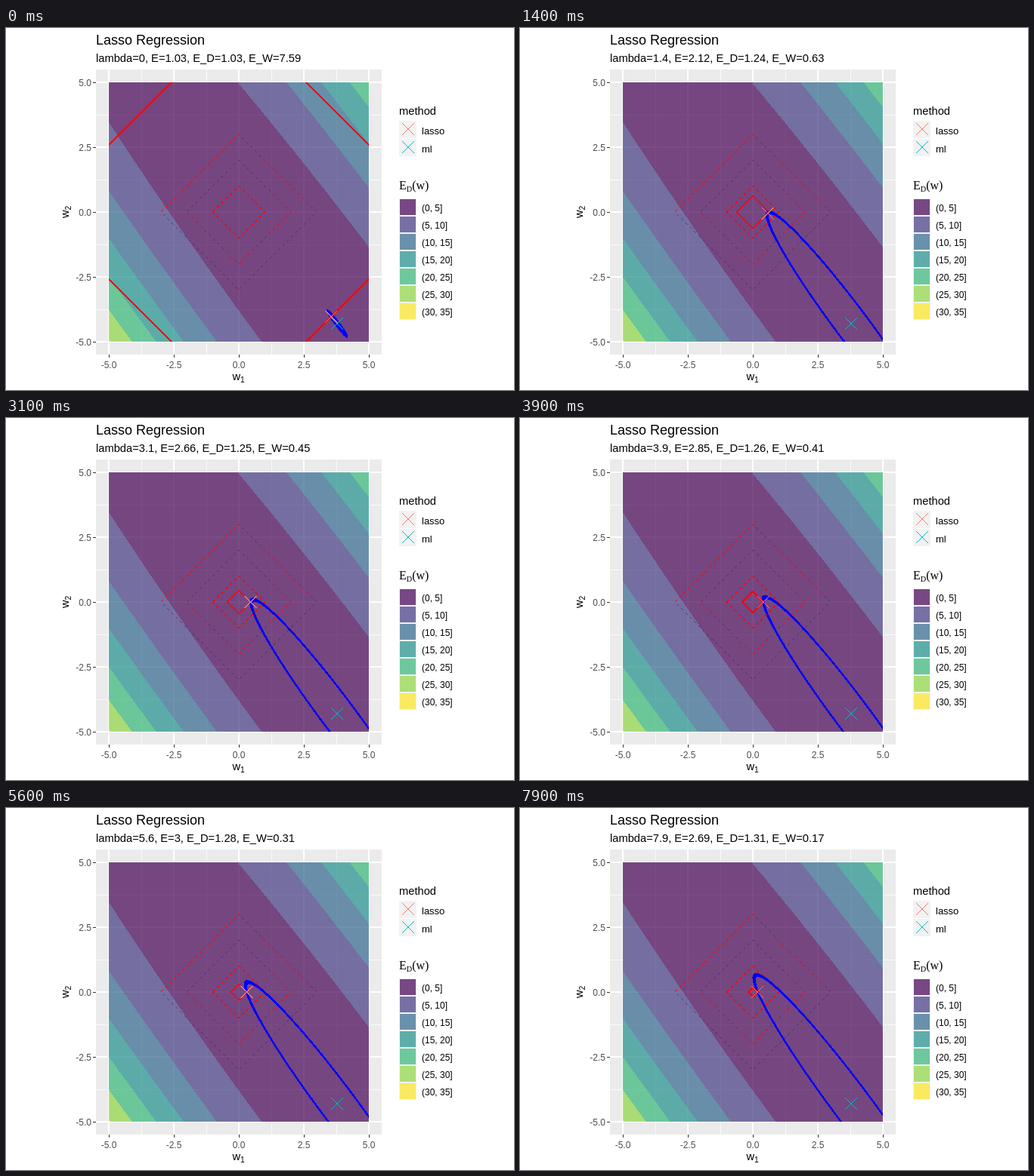
Animation, 672 px wide and 480 px high, one loop 8 s. Source, as an HTML page:

```html
<!DOCTYPE html>
<html lang="en">
<head>
<meta charset="utf-8">
<title>Lasso Regression</title>
<style>
  html, body { margin: 0; width: 100%; height: 100%; overflow: hidden; background: #fff; }
  svg { display: block; width: 672px; height: 480px; }
  text { font-family: "Liberation Sans", Arial, sans-serif; white-space: pre; }
  .tick { font-size: 12px; fill: #4d4d4d; }
  .key { font-size: 12px; }
  .method { font-size: 13px; }
  .head { font-size: 14.7px; }
  .math { font-family: "Liberation Serif", "Times New Roman", serif; font-size: 16px; }
  .sub { font-size: 10.3px; }
  path, line, rect { shape-rendering: crispEdges; }
</style>
</head>
<body>
<svg id="stage" viewBox="0 0 672 480">
  <defs><clipPath id="area"><rect x="136" y="72" width="344" height="344"/></clipPath></defs>
  <rect x="119" y="55" width="378" height="378" fill="#ebebeb"/>
  <g id="grid"></g>
  <g id="bands" clip-path="url(#area)" opacity=".7"></g>
  <g id="dashes" fill="none"></g>
  <g clip-path="url(#area)">
    <path id="ring" fill="#00f" fill-rule="evenodd" stroke="#00f" stroke-width="2"/>
    <path id="diamond" fill="none" stroke="#f00" stroke-width="1.6"/>
  </g>
  <g id="marks"></g>
  <g id="labels"></g>
  <g id="legend"></g>
</svg>
<script>
const byId = id => document.getElementById(id);
const SCALE = 34.4;
const px = x => 308 + SCALE * x;
const py = y => 244 - SCALE * y;

function add(parent, tag, attrs, text) {
  const node = document.createElementNS("http://www.w3.org/2000/svg", tag);
  for (const name in attrs) node.setAttribute(name, attrs[name]);
  if (text !== undefined) node.textContent = text;
  byId(parent).appendChild(node);
  return node;
}
const label = (parent, x, y, text, cls, anchor = "start") =>
  add(parent, "text", { x, y, class: cls, "text-anchor": anchor }, text);

// Data error: BASE + P * (dx + TILT * dy)^2 + dy^2 / LONG, around the ML solution
const ML = [3.78, -4.3];
const BASE = 1.032, P = 0.34, TILT = 0.7305, LONG = 88.4;

function dataError([x, y]) {
  const dx = x - ML[0], dy = y - ML[1];
  return BASE + P * (dx + TILT * dy) ** 2 + dy * dy / LONG;
}

const polygon = points =>
  "M" + points.map(([x, y]) => px(x).toFixed(2) + " " + py(y).toFixed(2)).join("L") + "Z";

function contour(level) {
  const k = level - BASE;
  if (k <= 0) return "";
  const points = [];
  for (let i = 0; i < 360; i++) {
    const a = i * Math.PI / 180;
    const dy = Math.sqrt(k * LONG) * Math.sin(a);
    points.push([ML[0] + Math.sqrt(k / P) * Math.cos(a) - TILT * dy, ML[1] + dy]);
  }
  return polygon(points);
}

const diamond = r => polygon([[-r, 0], [0, r], [r, 0], [0, -r]]);

// Coefficients shrink along the valley, then along the w1 axis
function lasso(lambda) {
  const w2 = -4.036 + 2.843 * lambda;
  return w2 < 0 ? [3.554 - 2.13 * lambda, w2] : [0.6337 - 0.0582 * lambda, 0];
}

function cross(parent, x, y, stroke) {
  return add(parent, "path", {
    d: "M-8-8L8 8M-8 8L8-8", stroke, "stroke-width": 1, transform: `translate(${x} ${y})`
  });
}

// Grid, ticks and axis text
const gridLine = (v, width) => {
  const style = { stroke: "#fff", "stroke-width": width };
  add("grid", "line", { x1: px(v), x2: px(v), y1: 55, y2: 433, ...style });
  add("grid", "line", { x1: 119, x2: 497, y1: py(v), y2: py(v), ...style });
};
for (let v = -3.75; v < 5; v += 2.5) gridLine(v, 0.8);
for (let v = -5; v <= 5; v += 2.5) {
  gridLine(v, 1.4);
  const style = { stroke: "#333", "stroke-width": 1 };
  add("grid", "line", { x1: px(v), x2: px(v), y1: 433, y2: 437, ...style });
  add("grid", "line", { x1: 115, x2: 119, y1: py(v), y2: py(v), ...style });
  label("labels", px(v), 451, v.toFixed(1), "tick", "middle");
  label("labels", 113, py(v) + 4.5, v.toFixed(1), "tick", "end");
}
label("labels", 119, 22, "Lasso Regression").setAttribute("font-size", 18);
const subtitle = label("labels", 119, 45, "", "head");

function axisTitle(index, transform) {
  const text = add("labels", "text", { class: "head", transform }, "w");
  text.innerHTML += `<tspan class="sub" dy="3">${index}</tspan>`;
}
axisTitle(1, "translate(299.5 467)");
axisTitle(2, "translate(83 252) rotate(-90)");

// Filled error bands and their legend
const COLORS = ["#440154", "#443a83", "#31688e", "#21908c", "#35b779", "#8fd744", "#fde725"];
for (let i = COLORS.length - 1; i >= 0; i--)
  add("bands", "path", { d: contour(5 * (i + 1)), fill: COLORS[i] });

label("legend", 520, 115, "method", "head");
label("legend", 520, 214, "", "math").innerHTML =
  'E<tspan class="sub" dy="3">D</tspan><tspan dy="-3">(w)</tspan>';
COLORS.forEach((fill, i) => {
  const y = 226 + 23 * i;
  add("legend", "rect", { x: 520, y, width: 23, height: 23, fill: "#f2f2f2" });
  add("legend", "rect", { x: 521, y: y + 1, width: 21, height: 21, fill, opacity: 0.7 });
  label("legend", 550, y + 16.5, `(${5 * i}, ${5 * i + 5}]`, "key");
});
const SALMON = "#f8766d", TEAL = "#00bfc4";
[["lasso", SALMON], ["ml", TEAL]].forEach(([name, color], i) => {
  const y = 134 + 24 * i;
  add("legend", "rect", { x: 520, y: y - 11.5, width: 23, height: 23, fill: "#f2f2f2" });
  cross("legend", 532, y, color);
  label("legend", 550, y + 6.5, name, "method");
});

// Dashed diamonds: t runs left, top, right, bottom
const CORNERS = [[-1, 0], [0, 1], [1, 0], [0, -1], [-1, 0]];
function along(r, t) {
  const i = Math.min(Math.floor(t), 3), f = t - i;
  const [a, b] = [CORNERS[i], CORNERS[i + 1]];
  return px(r * (a[0] + (b[0] - a[0]) * f)) + " " + py(r * (a[1] + (b[1] - a[1]) * f));
}
function dashed(r, from, to, stroke, width) {
  const stops = [from];
  for (let t = Math.floor(from) + 1; t < to; t++) stops.push(t);
  stops.push(to);
  add("dashes", "path", {
    d: "M" + stops.map(t => along(r, t)).join("L"), stroke, "stroke-width": width,
    "stroke-dasharray": "4 4", "stroke-dashoffset": from * r * SCALE * Math.SQRT2
  });
}
for (const r of [1, 2, 3]) dashed(r, 0, 4, "rgba(60,30,100,.6)", 1);
const RED_PARTS = [
  [1, 0, 4], [2, 1.64, 2.46], [2, 2.74, 3.26], [2, 3.68, 4],
  [3, 0, 1], [3, 1.3, 1.9], [3, 3.78, 3.85]
];
for (const [r, from, to] of RED_PARTS) dashed(r, from, to, "#f00", r === 1 ? 1.4 : 1);

cross("marks", px(ML[0]), py(ML[1]), TEAL);
const lassoMark = cross("marks", 0, 0, SALMON);

const STEP = 100, COUNT = 80;
const round = v => +v.toFixed(2);
let shown = -1;

function draw(now) {
  const step = Math.floor(now / STEP) % COUNT;
  if (step !== shown) {
    shown = step;
    const lambda = step / 10;
    const w = lasso(lambda);
    const ed = dataError(w), ew = Math.abs(w[0]) + Math.abs(w[1]);
    const level = round(ed);
    subtitle.textContent =
      `lambda=${lambda}, E=${round(ed + lambda * ew)}, E_D=${level}, E_W=${round(ew)}`;
    // every point whose rounded error equals the lasso error
    byId("ring").setAttribute("d", contour(level + 0.005) + contour(level - 0.005));
    byId("diamond").setAttribute("d", diamond(ew));
    lassoMark.setAttribute("transform", `translate(${px(w[0])} ${py(w[1])})`);
  }
}

const start = performance.now();
function tick() {
  draw(performance.now() - start);
  requestAnimationFrame(tick);
}
tick();
</script>
</body>
</html>
```
